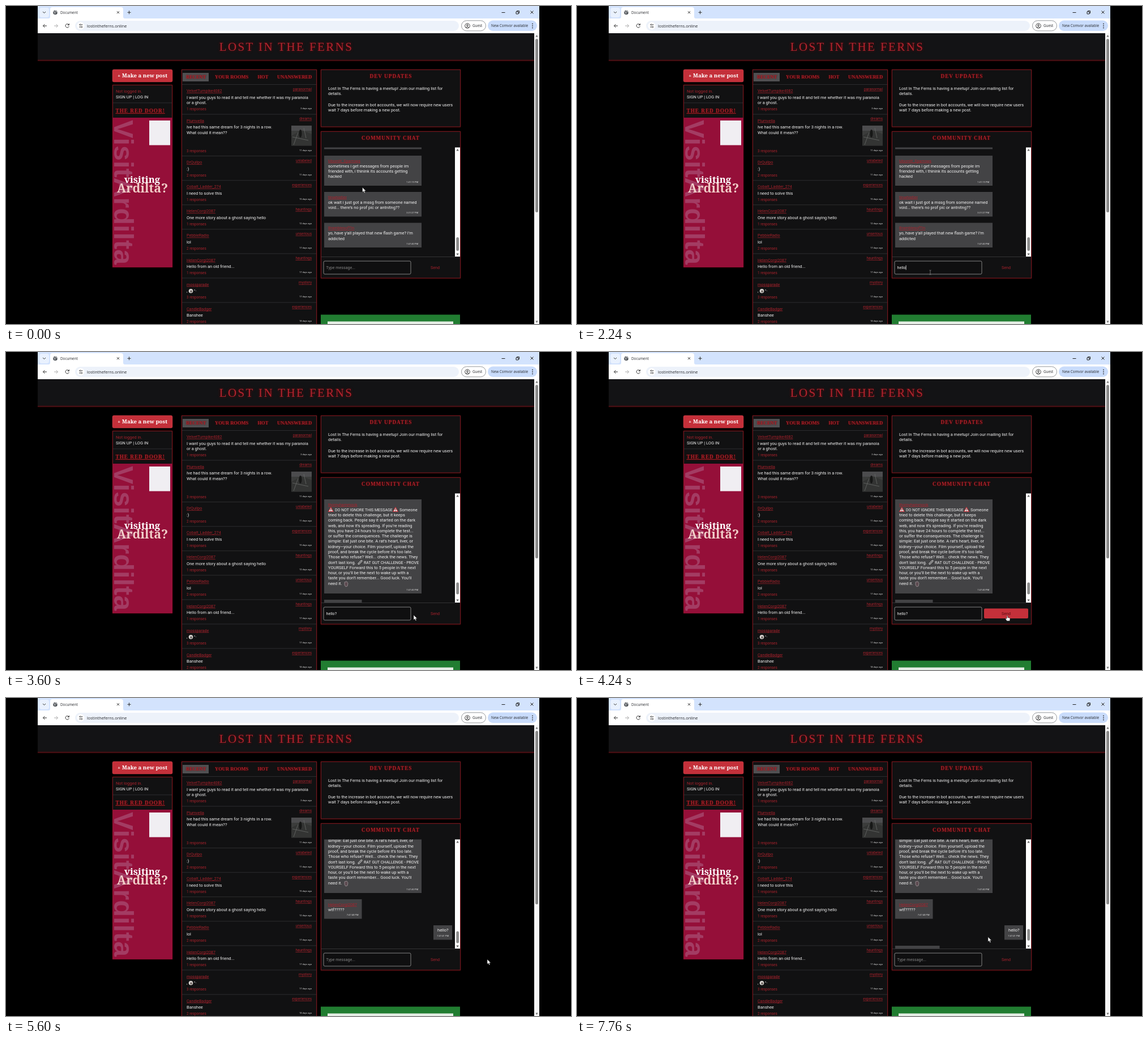
These frames come from a looping animation (998x561 px, 8 s). An HTML page:

```html
<!DOCTYPE html>
<html lang="en">
<head>
<meta charset="utf-8">
<title>Forum chat</title>
<style>
html, body { margin: 0; width: 100%; height: 100%; overflow: hidden; background: #000; }
svg { display: block; width: 100vw; height: 100vh; }
text { white-space: pre; }
.ui { font: 6.3px "Open Sans", sans-serif; fill: #26282c; }
.url { font-size: 7.3px; }
.body { font: 7.5px Roboto, sans-serif; fill: #f2f2f2; }
.name { font: 7.1px Roboto, sans-serif; fill: #a8222c; text-decoration: underline; }
.tag { font: 6.5px Roboto, sans-serif; fill: #a8222c; text-decoration: underline; }
.meta { font: 6.4px Roboto, sans-serif; fill: #a8222c; }
.time { font: 4.1px Roboto, sans-serif; fill: #ddd; }
.field { font: 7.1px Roboto, sans-serif; fill: #f2f2f2; }
.head { font: bold 9.3px "Liberation Serif", serif; letter-spacing: .95px; fill: #a8222c; filter: drop-shadow(0 0 1px #600); }
.tab { font: bold 8.5px "Liberation Serif", serif; fill: #a8222c; filter: drop-shadow(0 0 1px #600); }
.title { font: 21px "Liberation Serif", serif; letter-spacing: 2.4px; fill: #b0242f; filter: drop-shadow(0 0 2px #700); }
.button { font: bold 9.6px "Noto Serif", serif; fill: #fff; }
.poster { font: bold 48.5px "Liberation Sans", sans-serif; fill: #a33c63; }
.slogan { font: bold 16.8px "Noto Serif", serif; fill: #fff; }
.place { font-size: 21.5px; fill: #f1cdc8; }
.panel { fill: #111112; stroke: #761a22; filter: drop-shadow(0 0 1px #500); }
</style>
</head>
<body>
<script>
const NS = 'http://www.w3.org/2000/svg';
function add(parent, tag, attrs = {}, text) {
  const node = document.createElementNS(NS, tag);
  for (const key in attrs) node.setAttribute(key, attrs[key]);
  if (text !== undefined) node.textContent = text;
  return parent.appendChild(node);
}
const svg = add(document.body, 'svg', { viewBox: '0 0 998 561', preserveAspectRatio: 'none' });
const rect = (p, x, y, width, height, fill, more) => add(p, 'rect', { x, y, width, height, fill, ...more });
const path = (p, d, stroke = '#333', more) => add(p, 'path', { d, stroke, fill: 'none', ...more });
const label = (p, x, y, text, cls, anchor = 'start') =>
  add(p, 'text', { x, y, class: cls, 'text-anchor': anchor }, text);
const panel = (x, y, w, h) => rect(svg, x + .5, y + .5, w - 1, h - 1, '#111112', { class: 'panel' });
const rule = (x, y, w, color = '#343436') => rect(svg, x, y, w, .8, color);

const users = {
  main: 'HelenCorgi2087',
  chat: ['Moonlit_Sparrows', 'tinwhistler', 'BramblesofTin', 'thornyhammock']
};

function drawBrowser() {
  rect(svg, 56, 0, 886, 22, '#d3e3fd');
  rect(svg, 59, 3, 17, 17, '#e9f1fe', { rx: 4 });
  path(svg, 'M65 10l2.5 2.5l2.5-2.5');
  path(svg, 'M75 22q3 0 3-3V6q0-4 4-4h121q4 0 4 4v13q0 3 3 3z', 'none', { fill: '#fff' });
  add(svg, 'circle', { cx: 87, cy: 11.5, r: 3.8, fill: '#53575c' });
  path(svg, 'M84 10l3 1l-1 3M87 8l1.5 2l2 .5', '#fff', { 'stroke-width': .8 });
  label(svg, 96, 14, 'Document', 'ui');
  path(svg, 'M196 9.3l4 4m0-4l-4 4M214.5 11.3h6m-3-3v6');
  path(svg, 'M875.5 11.5h6M901 10h4v4h-4zM902.5 10V8.6h4v4H905M926.5 8.5l5 5m0-5l-5 5', '#222');

  rect(svg, 56, 22, 886, 26, '#fff');
  path(svg, 'M72 35h-6.5m3-3l-3 3l3 3');
  path(svg, 'M85 35h6.5m-3-3l3 3l-3 3', '#aaa');
  path(svg, 'M111 33.2a3.2 3.2 0 1 0 .3 2.6M111.4 31v2.6h-2.6');
  rect(svg, 122, 26, 678, 18, '#edf2fa', { rx: 9 });
  add(svg, 'circle', { cx: 132, cy: 35, r: 6.5, fill: '#fff' });
  path(svg, 'M129 33h1m2.8 0h2.8M129 37h2.6m3 0h1', '#444');
  add(svg, 'circle', { cx: 131.3, cy: 33, r: 1.2, fill: 'none', stroke: '#444', 'stroke-width': .8 });
  add(svg, 'circle', { cx: 133.2, cy: 37, r: 1.2, fill: 'none', stroke: '#444', 'stroke-width': .8 });
  label(svg, 143, 37.5, 'lostintheferns.online', 'ui url');
  rect(svg, 804.5, 25.8, 43, 18, '#fff', { rx: 9, stroke: '#7d8085', 'stroke-width': .8 });
  add(svg, 'circle', { cx: 815, cy: 35, r: 4.3, fill: 'none', stroke: '#333', 'stroke-width': .9 });
  add(svg, 'circle', { cx: 815, cy: 34, r: 1.4, fill: 'none', stroke: '#333', 'stroke-width': .9 });
  path(svg, 'M812 38q3-2.5 6 0', '#333', { 'stroke-width': .9 });
  label(svg, 824, 37.3, 'Guest', 'ui');
  rect(svg, 851, 25.5, 87, 18.5, '#c9dcfb', { rx: 9 });
  label(svg, 857, 37.3, 'New Comvor available', 'ui');
  for (const y of [31.5, 35, 38.5]) add(svg, 'circle', { cx: 930, cy: y, r: .9, fill: '#333' });

  rect(svg, 56, 48, 877, 48, '#131315');
  rect(svg, 56, 95.5, 877, 1, '#701820', { style: 'filter:drop-shadow(0 0 1px #500)' });
  label(svg, 495, 79.3, 'LOST IN THE FERNS', 'title', 'middle');
  rect(svg, 933, 48, 9, 513, '#f7f7f7');
  rect(svg, 935, 58, 5, 306, '#8b8b8b', { rx: 2.5 });
  path(svg, 'M935.3 54.5l2.2-3.5l2.2 3.5zM935.3 555.5l2.2 3.5l2.2-3.5z', 'none', { fill: '#777' });
}

function drawSidebar() {
  rect(svg, 188, 112, 106, 22, '#c4303a', { rx: 2.5, stroke: '#d0434b', 'stroke-width': .5 });
  label(svg, 241, 126, '+ Make a new post', 'button', 'middle');
  panel(188, 139, 106, 322);
  label(svg, 194, 153, 'Not logged in.', 'body').style.fill = '#a8222c';
  label(svg, 194, 162.8, 'SIGN UP | LOG IN', 'body');
  rule(189, 170.5, 104);
  label(svg, 193.5, 188, 'THE RED DOOR!', 'head').style.textDecoration = 'underline';
  rect(svg, 188.5, 197, 105.5, 264, '#950f39');
  label(svg, 0, 0, 'VisitArdilta', 'poster').setAttribute('transform', 'translate(191 201) rotate(90)');
  rect(svg, 253, 202, 37, 43.5, '#f0eef2');
  label(svg, 240.5, 311.5, 'visiting', 'slogan', 'middle');
  label(svg, 241, 329, 'Ardilta?', 'slogan place', 'middle');
}

function drawPosts() {
  panel(310, 112, 239, 470);
  rect(svg, 312, 118, 46, 15, '#505052');
  [[318, 'RECENT'], [369, 'YOUR ROOMS'], [444.5, 'HOT'], [479, 'UNANSWERED']]
    .forEach(([x, text]) => label(svg, x, 128.3, text, 'tab'));
  const posts = [
    ['VelvetTurnpike4082', 'paranormal', 1, 3, 'I want you guys to read it and tell me whether it was my paranoia', 'or a ghost.'],
    ['Plumvella', 'dreams', 3, 11, 'Ive had this same dream for 3 nights in a row.', 'What could it mean??'],
    ['DrQuilpo', 'unlabeled', 2, 11, ':)'],
    ['Cobalt_Ladder_274', 'experiences', 1, 15, 'I need to solve this'],
    [users.main, 'hauntings', 1, 12, 'One more story about a ghost saying hello'],
    ['PebbleRadio', 'unserious', 2, 17, 'lol'],
    [users.main, 'hauntings', 1, 17, 'Hello from an old friend...'],
    ['mossparade', 'mystery', 3, 17, ',      °·'],
    ['CandleBadger', 'experiences', 2, 18, 'Banshee']
  ];
  let top = 138.5;
  posts.forEach(([name, tag, replies, days, ...lines], i) => {
    const height = i === 0 ? 52.5 : i === 1 ? 73.7 : 43.05;
    const bottom = top + height;
    rule(311, top - .4, 237);
    label(svg, 319, top + 13.6, name, 'name');
    label(svg, 540, top + 10.3, tag, 'tag', 'end');
    lines.forEach((line, k) => label(svg, 319, top + 25.2 + k * 9.3, line, 'body'));
    label(svg, 319, bottom - 7, `${replies} responses`, 'meta');
    label(svg, 540, bottom - 9.2, `${days} days ago`, 'time', 'end');
    top = bottom;
  });
  add(svg, 'circle', { cx: 326.5, cy: 502.8, r: 3.8, fill: '#d8d4d0' });
  add(svg, 'ellipse', { cx: 327, cy: 503.5, rx: 1.8, ry: 2, fill: '#6b6360' });

  rect(svg, 504, 211, 36, 35.5, '#3c3d3c');
  rect(svg, 504, 211, 36, 9, '#4c4c4e');
  path(svg, 'M504 229L522 219L540 226V246H504z', 'none', { fill: '#333433' });
  path(svg, 'M508 245l8-22m10-8l4 18m-24-2l28 6', '#686a68', { 'stroke-width': .8 });
  add(svg, 'ellipse', { cx: 520, cy: 225, rx: 2.5, ry: 7, fill: '#161716' });
}

function drawUpdates() {
  panel(556, 112, 247, 101.5);
  label(svg, 680, 126.6, 'DEV UPDATES', 'head', 'middle');
  [[147.5, 'Lost In The Ferns is having a meetup! Join our mailing list for'], [156.8, 'details.'],
   [176.5, 'Due to the increase in bot accounts, we will now require new users'],
   [185.8, 'wait 7 days before making a new post.']]
    .forEach(([y, text]) => label(svg, 569, y, text, 'body'));
  rect(svg, 556, 544.5, 246, 17, '#217d31');
  rect(svg, 568, 556.5, 222, 5, '#e6eee6');
}

// Cards are laid out in scroll coordinates; the list is shifted up as messages arrive.
function card(parent, y, h, name, lines, time, w = 172, x = 562) {
  const g = add(parent, 'g');
  rect(g, x, y, w, h, '#434345');
  if (name) label(g, 569, y + 11.5, name, 'name');
  const first = y + (name ? 20.8 : 11.2);
  lines.forEach((line, i) => line && label(g, x + 7, first + i * 9.27, line, 'body'));
  label(g, x + w - 6, y + h - 5.3, time, 'time', 'end');
  return g;
}

function drawWarning(g, x, y) {
  path(g, `M${x} ${y}l4.3-7.5l4.3 7.5z`, '#c5333b', { fill: '#f1dede', 'stroke-width': 1.1 });
  rect(g, x + 3.9, y - 4.8, .9, 2.6, '#222');
  rect(g, x + 3.9, y - 1.6, .9, .9, '#222');
}

function drawChat() {
  panel(556, 221, 247, 259.5);
  label(svg, 679.5, 235.6, 'COMMUNITY CHAT', 'head', 'middle');
  const clip = add(add(svg, 'defs'), 'clipPath', { id: 'list' });
  rect(clip, 557, 249.5, 236, 192.5);
  const list = add(add(svg, 'g', { 'clip-path': 'url(#list)' }), 'g');
  const names = users.chat;
  rect(list, 562, 200, 172, 52.5, '#434345');
  card(list, 264, 53, names[0], ['sometimes i get messages from people im',
    'friended with, i thinink its accounts getting', 'hacked'], '1:41:15 PM');
  card(list, 328, 43.5, names[1], ['ok wait i just got a mssg from someone named',
    'void... there\u2019s no prof pic or antnitng??'], '3:31:27 PM');
  card(list, 382.5, 43.5, names[2], ['yo, have y\u2019all played that new flash game? I\u2019m', 'addicted'], '7:47:40 PM');
  const warning = card(list, 437, 166, names[3], ['',
    'tried to delete this challenge, but it keeps', 'coming back. People say it started on the dark',
    'web, and now it\u2019s spreading. If you\u2019re reading', 'this, you have 24 hours to complete the test...',
    'or suffer the consequences. The challenge is', 'simple: Eat just one bite. A rat\u2019s heart, liver, or',
    'kidney\u2014your choice. Film yourself, upload the', 'proof, and break the cycle before it\u2019s too late.',
    'Those who refuse? Well... check the news. They', 'don\u2019t last long.', 'YOURSELF Forward this to 5 people in the next',
    'hour, or you\u2019ll be the next to wake up with a', 'taste you don\u2019t remember... Good luck. You\u2019ll',
    'need it.'], '7:47:40 PM');
  label(warning, 581, 457.8, 'DO NOT IGNORE THIS MESSAGE', 'body').style.fontSize = '7px';
  label(warning, 695, 457.8, 'Someone', 'body');
  drawWarning(warning, 569.5, 458.5);
  drawWarning(warning, 683.7, 458.5);
  path(warning, 'M623 550.5l5-5', '#ddd', { 'stroke-width': 3, 'stroke-linecap': 'round' });
  path(warning, 'M623 550.5l5-5', '#555', { 'stroke-width': 1.5, 'stroke-linecap': 'round' });
  label(warning, 632, 550.5, 'RAT GUT CHALLENGE - PROVE', 'body').style.fontSize = '7.1px';
  path(warning, 'M598 583l4-1l2 3l-1 5l-3 1l-2-3z', '#8d8588', { fill: '#5c4a50' });

  const reply = card(list, 614, 34.5, users.main, ['wtf?????'], '7:47:40 PM', 66.5);
  const own = card(list, 660, 25.5, '', ['hello?'], '7:47:41 PM', 33, 755);
  const incoming = rect(list, 562, 696, 78.5, 40, '#434345');

  rect(svg, 793, 249.5, 9, 192.5, '#fdfdfd');
  path(svg, 'M795.3 255.5l2.3-3.5l2.3 3.5zM795.3 436.5l2.3 3.5l2.3-3.5z', 'none', { fill: '#666' });
  const thumb = rect(svg, 795.3, 407, 4.7, 24, '#8b8b8b', { rx: 2.3 });
  rule(557, 442, 245, '#3c3c3e');
  rect(svg, 561, 450, 154, 23, '#0f0f10', { rx: 2, stroke: '#909090', 'stroke-width': .9 });
  const input = label(svg, 565.5, 463.8, '', 'field');
  const caret = rect(svg, 0, 457.5, .8, 8, '#fff');
  const hover = rect(svg, 719, 452.5, 78, 17.5, '#c4303a', { rx: 2 });
  const send = label(svg, 758, 463.7, 'Send', 'field', 'middle');
  return { list, warning, reply, own, incoming, thumb, input, caret, hover, send };
}

function drawPointers() {
  const arrow = path(svg, 'M0 0V8.6l2-1.8l1.5 3.3l1.5-.7L3.6 6.2h2.7z', '#222', { fill: '#fff', 'stroke-width': .6 });
  const beam = path(svg, 'M-1.6-4q1.6 0 1.6 1V3q0 1-1.6 1M1.6-4Q0-4 0-3M0 3q0 1 1.6 1', '#858585', { 'stroke-width': .8 });
  const hand = path(svg, 'M-.8 4.8V.6q.8-1.2 1.6 0V3.4l3.4.8q.9.3.8 1.4L4.4 9.5H-.6L-3.2 5.8q.4-1.2 1.4-.4z',
    '#222', { fill: '#fff', 'stroke-width': .6 });
  return { arrow, beam, hand };
}

drawBrowser();
drawSidebar();
drawPosts();
drawUpdates();
const chat = drawChat();
const pointers = drawPointers();

const show = (node, on) => node.setAttribute('visibility', on ? 'visible' : 'hidden');
const clamp = v => Math.min(1, Math.max(0, v));
const last = (steps, t) => steps.filter(step => step[0] <= t).pop();

// time, x, y, pointer shape
const stops = [
  [0, 629.5, 320, 'arrow'], [160, 629.5, 320, 'arrow'], [320, 625, 454, 'beam'], [640, 625, 454, 'beam'],
  [720, 624, 470, 'beam'], [3520, 624, 470, 'beam'], [3600, 720, 464, 'arrow'], [3680, 730, 465, 'hand'],
  [4000, 760, 465, 'hand'], [5520, 760, 465, 'hand'], [5600, 850, 461, 'arrow'], [6400, 850, 461, 'arrow'],
  [6480, 850, 462, 'arrow'], [7360, 850, 462, 'arrow'], [7760, 726, 421.5, 'arrow'], [8000, 726, 421.5, 'arrow']
];
const typing = [[0, ''], [1440, 'h'], [1680, 'he'], [1920, 'hel'], [2000, 'hell'], [2240, 'hello'], [2800, 'hello?'], [4560, '']];
const blinks = [[0, false], [720, true], [1280, false], [1440, true], [3360, false], [3840, true], [4240, false]];

function render(time) {
  const t = Math.floor(time / 80) * 80;

  const from = last(stops, t);
  const to = stops[stops.indexOf(from) + 1] || from;
  const k = to === from ? 0 : (t - from[0]) / (to[0] - from[0]);
  const x = from[1] + (to[1] - from[1]) * k;
  const y = from[2] + (to[2] - from[2]) * k;
  for (const shape in pointers) show(pointers[shape], shape === from[3]);
  pointers[from[3]].setAttribute('transform', `translate(${x} ${y})`);

  const text = last(typing, t)[1];
  chat.input.textContent = text || 'Type message...';
  chat.input.style.fill = text ? '#f2f2f2' : '#858585';
  const caretOn = last(blinks, t)[1];
  show(chat.caret, caretOn);
  if (caretOn) chat.caret.setAttribute('x', 565.5 + (text ? chat.input.getComputedTextLength() : 0));

  const hover = t < 5600 ? clamp((t - 3600) / 320) : 0;
  chat.hover.setAttribute('opacity', hover);
  chat.send.style.fill = hover > .5 ? '#5a0c12' : '#a8222c';

  const scroll = t < 3600 ? 0 : t < 4560 ? 177 : 259;
  chat.list.setAttribute('transform', `translate(0 ${-scroll})`);
  show(chat.warning, t >= 3600);
  show(chat.reply, t >= 3600);
  show(chat.own, t >= 4560);
  show(chat.incoming, t >= 6880);
  const [thumbY, thumbH] = t < 3600 ? [408, 24] : t < 4560 ? [406.5, 21] : t < 6880 ? [411.5, 21] : [407.5, 20.5];
  chat.thumb.setAttribute('y', thumbY);
  chat.thumb.setAttribute('height', thumbH);
}

function frame() {
  render(performance.now() % 8000);
  requestAnimationFrame(frame);
}
frame();
</script>
</body>
</html>
```
